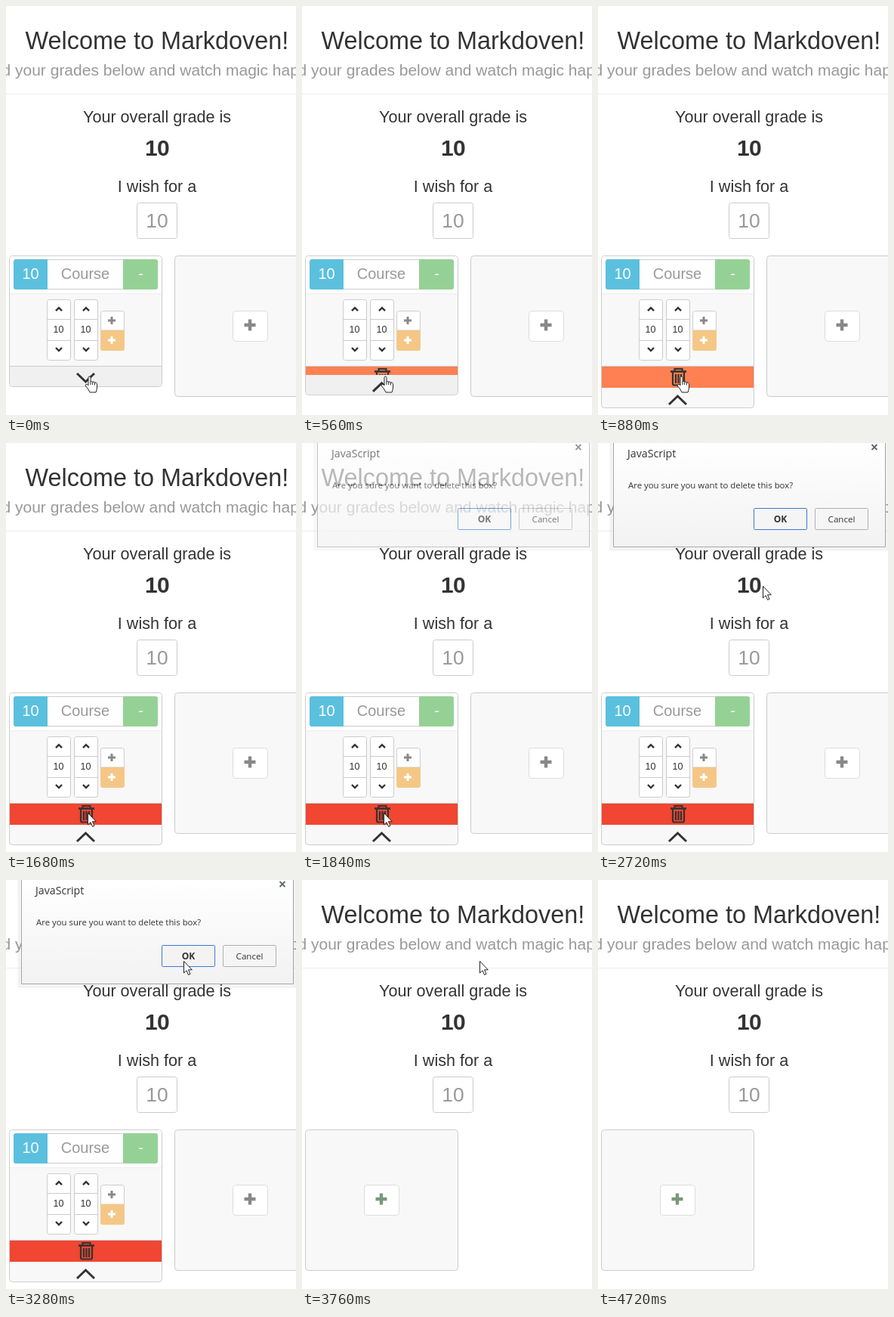
These frames come from a looping animation (384 px wide and 541 px high, 5200 ms). An HTML page:

```html
<!DOCTYPE html>
<html lang="en">
<head>
<meta charset="utf-8">
<title>Grade overview</title>
<style>
  html, body { margin: 0; width: 100%; height: 100%; overflow: hidden; background: #fff; }
  svg { display: block; }
  text { font-family: "Liberation Sans", Arial, sans-serif; fill: #333; }
  .mid { text-anchor: middle; }
  .muted { fill: #999; }
  .white { fill: #fff; }
  .box { fill: #f8f8f8; stroke: #ccc; }
  .field { fill: #fff; stroke: #ccc; }
  .line { fill: none; stroke: #333; }
  #dialog text { font-family: "Open Sans", "Noto Sans", sans-serif; }
</style>
</head>
<body>
<svg id="stage" width="384" height="541" viewBox="0 0 384 541">
  <defs>
    <linearGradient id="sheet" x2="0" y2="1">
      <stop offset="0" stop-color="#fff"/>
      <stop offset="1" stop-color="#f2f2f2"/>
    </linearGradient>
    <g id="spinner">
      <rect class="field" x=".5" y=".5" width="31" height="80" rx="3"/>
      <path d="M1 26.5H31M1 54.5H31" stroke="#ccc"/>
      <path class="line" stroke-width="2.4" d="M12 15.2L16 11.2L20 15.2M12 64L16 68L20 64"/>
      <text class="mid" x="15.5" y="44" font-size="12.6">10</text>
    </g>
  </defs>

  <text x="25.6" y="57" font-size="32.4">Welcome to Markdoven!</text>
  <text class="muted" x="-5.5" y="92" font-size="21">d your grades below and watch magic happen</text>
  <path d="M0 116.5H384" stroke="#eee"/>
  <text class="mid" x="200" y="154" font-size="21.6">Your overall grade is</text>
  <text class="mid" x="200" y="198" font-size="30" font-weight="bold" letter-spacing="-.6">10</text>
  <text class="mid" x="200" y="246" font-size="21.6">I wish for a</text>
  <rect class="field" x="173.5" y="260.5" width="53" height="47" rx="3"/>
  <text class="mid muted" x="200" y="292.5" font-size="26.4">10</text>

  <g id="course">
    <rect id="card" class="box" x="4.5" y="330.5" width="202" height="173" rx="4"/>
    <path d="M5 380V335q0-4 4-4H202q4 0 4 4V380Z" fill="#fff"/>
    <path d="M5 380.5H206" stroke="#eee"/>
    <rect class="field" x="54.5" y="335.5" width="101" height="39"/>
    <path d="M55 335V375H13q-3 0-3-3V338q0-3 3-3Z" fill="#5bc0de"/>
    <path d="M155 335V375H198q3 0 3-3V338q0-3-3-3Z" fill="#95d195"/>
    <text class="mid white" x="32.5" y="361" font-size="20">10</text>
    <text class="mid muted" x="105" y="361" font-size="20">Course</text>
    <text class="mid white" x="178.5" y="361" font-size="20">-</text>
    <use href="#spinner" x="54" y="388"/>
    <use href="#spinner" x="90" y="388"/>
    <path class="field" d="M125.5 429V406.5q0-3 3-3H153.5q3 0 3 3V429Z"/>
    <path d="M125 429H157V453q0 3-3 3H128q-3 0-3-3Z" fill="#f4c786"/>
    <path d="M135 416H145M140 411V421" stroke="#888" stroke-width="3"/>
    <path d="M135 442H145M140 437V447" stroke="#fff" stroke-width="3"/>

    <path d="M5 476.5H206" stroke="#ccc"/>
    <svg id="drawer" x="5" y="477" width="201" height="0">
      <rect id="bin" width="201" height="28"/>
      <g class="line" stroke-width="2.2">
        <path stroke-width="2.6" d="M91 6.5H112"/>
        <path d="M96.5 6V3H106.5V6M94 7V22.5q0 2 2 2H107q2 0 2-2V7"/>
        <path d="M98 10V22M101.5 10V22M105 10V22"/>
      </g>
    </svg>
    <g id="footer">
      <path id="shade" d="M5 477H206V499q0 4-4 4H9q-4 0-4-4Z" fill="#f0f0f0"/>
      <path id="chevron" class="line" stroke-width="3"/>
    </g>
  </g>

  <g id="adder">
    <rect class="box" x="4.5" y="330.5" width="202" height="186" rx="4"/>
  </g>
  <g id="add">
    <rect x="82.5" y="403.5" width="46" height="40" rx="4" fill="#fff" stroke="#ddd"/>
    <path id="plus" d="M97.5 422H112.5M105 414.5V429.5" stroke-width="4.4"/>
  </g>

  <g id="dialog">
    <path d="M17.5 0V140.5H382.5V0" fill="none" stroke="#000" stroke-opacity=".05" stroke-width="4"/>
    <path d="M20.5 -1V137.5H380.5V-1Z" fill="url(#sheet)" stroke="#a4a4a4"/>
    <text x="39" y="19" font-size="14.2">JavaScript</text>
    <path d="M362.5 2L369.5 9M369.5 2L362.5 9" stroke="#5f6470" stroke-width="1.8"/>
    <text x="40" y="60" font-size="11.4">Are you sure you want to delete this box?</text>
    <rect id="ok" x="206.5" y="86.5" width="70" height="28" rx="1" stroke="#3f78d0"/>
    <text class="mid" x="241.5" y="105" font-size="12" font-weight="bold">OK</text>
    <rect x="287.5" y="86.5" width="70" height="28" rx="1" fill="#f5f5f5" stroke="#b0b0b0"/>
    <text class="mid" x="322.5" y="105" font-size="11.6">Cancel</text>
  </g>

  <path id="hand" transform="translate(104.5 489)" fill="#fff" stroke="#222"
    d="M4.5 2.5Q4.5 1 6 1T7.5 2.5V8Q9 7 10.3 8.3Q12 7.6 13 9Q15.5 8.6 16 10.5V15Q16 18 14.5 22H6.5Q5 18 1.2 14Q0 12 1.5 11.3Q3 11 4.5 13ZM7.5 8V12M10.3 8.3V12M13 9V12.5"/>
  <path id="arrow" fill="#fff" stroke="#222"
    d="M.5 .5V16L4 12.7L6.6 18.5L9 17.4L6.5 11.8H11.3Z"/>
</svg>
<script>
  const LOOP = 5200, STEP = 80;
  const el = id => document.getElementById(id);
  const set = (id, name, value) => el(id).setAttribute(name, value);
  const show = (id, on) => set(id, 'visibility', on ? 'visible' : 'hidden');
  const moveX = (id, x) => set(id, 'transform', `translate(${x} 0)`);
  const clamp = v => Math.min(1, Math.max(0, v));
  const swing = p => .5 - Math.cos(p * Math.PI) / 2;
  const easeOut = p => p * (2 - p);

  // time, x, y of the arrow tip
  const route = [
    [0, 108, 489], [2080, 108, 489], [2160, 142, 448], [2640, 212, 219],
    [3200, 235, 107], [4480, 235, 107], [4560, 285, 250], [4640, 355, 436], [LOOP, 355, 436]
  ];

  function arrowAt(t) {
    const i = route.findIndex(p => p[0] > t);
    const [t0, x0, y0] = route[i - 1], [t1, x1, y1] = route[i];
    const p = easeOut((t - t0) / (t1 - t0));
    return [x0 + (x1 - x0) * p, y0 + (y1 - y0) * p];
  }

  function dialogOpacity(t) {
    return t < 3600 ? clamp((t - 1680) / 240) : clamp((3760 - t) / 240);
  }

  function draw(t) {
    const open = 28 * swing(clamp((t - 320) / 560));
    const removed = t >= 3760;

    show('course', !removed);
    set('card', 'height', 173 + open);
    set('drawer', 'height', open);
    set('bin', 'fill', t < 1680 ? '#ff8052' : '#f04632');
    set('footer', 'transform', `translate(0 ${open})`);
    set('shade', 'opacity', open > 14 ? 0 : 1);
    set('chevron', 'd', t < 400 ? 'M94 486L105.5 497L117 486' : 'M94 499L105.5 488L117 499');

    moveX('adder', removed ? 0 : 219);
    moveX('add', removed ? 0 : 218);
    set('plus', 'stroke', removed ? '#7a9878' : '#888');

    set('dialog', 'opacity', dialogOpacity(t));
    set('ok', 'fill', t >= 3280 ? '#f3f3f3' : t >= 3120 ? '#fafafa' : '#f5f5f5');

    show('hand', t < 1680);
    show('arrow', t >= 1680 && t < 4720);
    set('arrow', 'transform', `translate(${arrowAt(t).map(Math.round)})`);
  }

  const start = performance.now();
  function tick() {
    const t = (performance.now() - start) % LOOP;
    draw(Math.floor(t / STEP) * STEP);
    requestAnimationFrame(tick);
  }
  tick();
</script>
</body>
</html>
```
